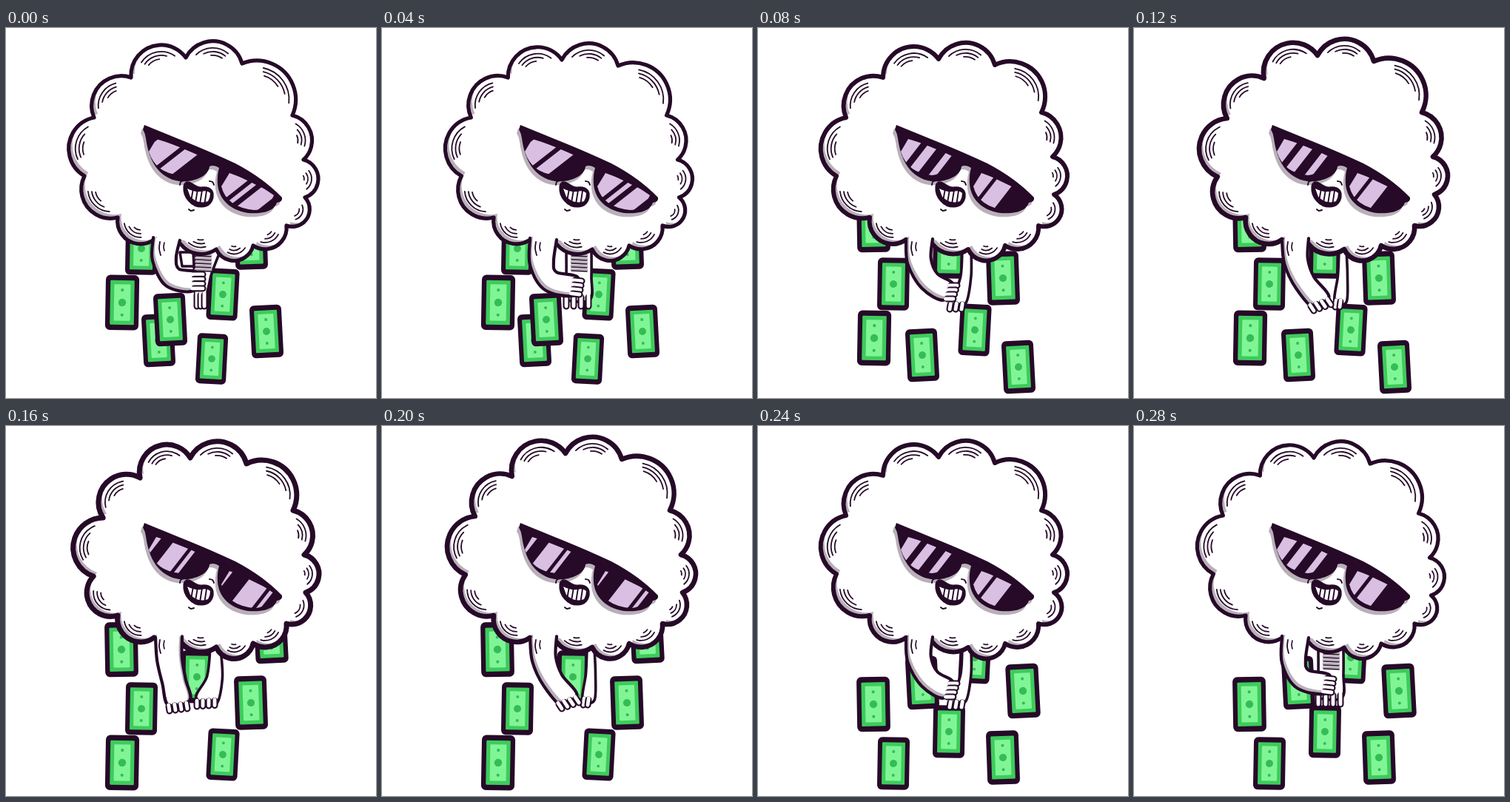
Animation of 500 by 500 pixels, one loop 0.32 s. Source, as an HTML page with a canvas:

```html
<!DOCTYPE html>
<html lang="en">
<head>
<meta charset="utf-8">
<title>Cloud making it rain</title>
<style>
html, body { margin: 0; width: 100%; height: 100%; overflow: hidden; background: #fff; }
canvas { display: block; width: 100vw; height: 100vh; }
</style>
</head>
<body>
<canvas id="stage" width="500" height="500"></canvas>
<script>
const ctx = document.getElementById('stage').getContext('2d');
const INK = '#260a28', GREY = '#b9b0ba', LILAC = '#d9bfe2', WHITE = '#fff';
const STEP = 40, POSE_ORDER = [0, 1, 2, 3, 4, 3, 2, 1];

// Cloud edge, clockwise: alternating notches and bump tops
const LEFT = [110, 242, 106, 200, 85, 158, 119, 121, 127, 77, 169, 67];
const TOP = [197, 25, 243, 40, 283, 18, 319, 48, 371, 55];
const RIGHT = [387, 118, 413, 146, 402, 178, 422, 204, 404, 229];
const START = [200, 286, 161, 284, 151, 256];
const END = [407, 257, 379, 267, 370, 291, 334, 294, 313, 314, 284, 299, 258, 305, 236, 292];

// Per pose: shift of the left, top and right parts, then line width
const SWAY = [
  [0, 0, 0, 0, 0, 0, 5.2],
  [1, 0, 0, 3, -2.5, 0, 5.2],
  [0, 0, 1, 2, -4, -4, 6],
  [5, 1, 5, -3, 2, -4, 6.6],
  [9, 3, 6, 3, 1, -4, 7]
];

// Arm centre lines, one per pose
const FRONT = [
  [217, 285, 214, 312, 225, 337, 255, 343],
  [218, 285, 216, 318, 228, 342, 262, 349],
  [218, 285, 218, 315, 232, 342, 257, 357],
  [218, 285, 219, 315, 231, 344, 254, 371],
  [220, 285, 221, 315, 227, 345, 234, 374]
];
const BACK = [
  [272, 300, 266, 330, 263, 360],
  [266, 300, 266, 335, 264, 366],
  [282, 300, 281, 335, 273, 370],
  [282, 300, 282, 335, 279, 370],
  [283, 300, 282, 340, 270, 372]
];
const BACK_WIDTH = [[17, 7], [17, 17], [6, 8], [5, 8], [7, 14]];

// Fingers: count, first knuckle, step to the next one, reach
const NEAR_HAND = [
  [4, 255, 333, 0, 6.3, 11, 0],
  [4, 261, 341, -1, 6, 9, 1],
  [4, 261, 348, -1.7, 6, 8, 0],
  [4, 239, 376, 7.7, -2.7, 4, 6],
  [4, 220, 379, 8, -1, 1, 6]
];
const FAR_HAND = [
  [3, 258, 361, 5, 0, 0, 15],
  [4, 249, 364, 10, 0, 0, 12],
  [3, 260, 374, 8, 0, -1, 6],
  [2, 273, 370, 6, 0, -1, 7],
  [4, 258, 373, 8, -.5, 0, 6]
];

// Falling bills: x, first y, first beat, beats in view, tilt, scale
const BILLS = [
  [183, 298, 0, 4, 1, 1], [331, 290, 0, 4, -2, 1.02], [156, 266, 1, 3, -1, 1.04],
  [157, 371, 0, 3, 1, 1.05], [206, 422, 0, 1, -3, 1], [358, 284, 2, 2, -3, 1.03],
  [352, 410, 0, 2, -3, 1], [222, 347, 3, 3, -3, 1], [293, 313, 3, 4, 3, .98],
  [258, 303, 1, 3, 1, 1], [278, 447, 0, 1, 3, .96]
];
const FALL = [48, 36, 74, 47];

// Lens glints: slant, then spans along each lens top
const GLINTS = [
  { dx: -46, left: [[.1, .55], [.65, .92]], right: [[0, .43], [.52, .61], [.72, 1.05]] },
  { dx: -28, left: [[0, .32], [.45, .64], [.84, .97]], right: [[0, .3], [.37, .68]] },
  { dx: -28, left: [[0, .16], [.4, .72], [.79, .87]], right: [[0, .12], [.46, .84], [.91, .98]] }
];

function pairs(list) {
  const out = [];
  for (let i = 0; i < list.length; i += 2) out.push([list[i], list[i + 1]]);
  return out;
}

// Smooth curve through points
function curve(p, closed) {
  const n = p.length;
  const at = i => closed ? p[(i + n) % n] : p[Math.max(0, Math.min(n - 1, i))];
  const path = new Path2D();
  path.moveTo(...p[0]);
  for (let i = 0; i < (closed ? n : n - 1); i++) {
    const [a, b, c, d] = [at(i - 1), at(i), at(i + 1), at(i + 2)];
    path.bezierCurveTo(b[0] + (c[0] - a[0]) / 6, b[1] + (c[1] - a[1]) / 6,
      c[0] - (d[0] - b[0]) / 6, c[1] - (d[1] - b[1]) / 6, c[0], c[1]);
  }
  if (closed) path.closePath();
  return path;
}

// Tapered limb around a centre line, open at its start
function limb(list, w1, w2) {
  const p = pairs(list), n = p.length - 1, outer = [], inner = [];
  p.forEach(([x, y], i) => {
    const a = p[Math.max(0, i - 1)], b = p[Math.min(n, i + 1)];
    const dx = b[0] - a[0], dy = b[1] - a[1];
    const k = (w1 + (w2 - w1) * i / n) / Math.hypot(dx, dy);
    outer.push([x - dy * k, y + dx * k]);
    inner.unshift([x + dy * k, y - dx * k]);
  });
  return curve([...outer, ...inner]);
}

function poly(points) {
  const path = new Path2D();
  points.forEach(p => path.lineTo(...p));
  path.closePath();
  return path;
}

function fill(path, color) { ctx.fillStyle = color; ctx.fill(path); }
function stroke(path, width, color = INK) {
  ctx.strokeStyle = color;
  ctx.lineWidth = width;
  ctx.stroke(path);
}
function line(x1, y1, x2, y2, width, color) {
  stroke(poly([[x1, y1], [x2, y2]]), width, color);
}

// White body with grey showing where the shifted copy leaves it bare
function shaded(path, dx, dy) {
  ctx.save();
  fill(path, GREY);
  ctx.clip(path);
  ctx.translate(dx, dy);
  fill(path, WHITE);
  ctx.restore();
}

// Circular arc through three points
function bump([ax, ay], [bx, by], [cx, cy]) {
  const d = 2 * (ax * (by - cy) + bx * (cy - ay) + cx * (ay - by));
  const a = ax * ax + ay * ay, b = bx * bx + by * by, c = cx * cx + cy * cy;
  const x = (a * (by - cy) + b * (cy - ay) + c * (ay - by)) / d;
  const y = (a * (cx - bx) + b * (ax - cx) + c * (bx - ax)) / d;
  const from = Math.atan2(ay - y, ax - x);
  let to = Math.atan2(cy - y, cx - x);
  if (to < from) to += Math.PI * 2;
  return { x, y, r: Math.hypot(ax - x, ay - y), from, to };
}

function makeCloud([lx, ly, tx, ty, rx, ry, width]) {
  const shift = (list, dx, dy) => pairs(list).map(([x, y]) => [x + dx, y + dy]);
  // On the left the notches travel further than the bump tops
  const left = pairs(LEFT).map(([x, y], i) => [x + lx * (i % 2 ? 1.35 : .65), y + ly]);
  const p = [...pairs(START), ...left, ...shift(TOP, tx, ty), ...shift(RIGHT, rx, ry), ...pairs(END)];
  const bumps = [], path = new Path2D();
  for (let i = 0; i + 2 < p.length; i += 2) {
    const b = bump(p[i], p[i + 1], p[i + 2]);
    bumps.push(b);
    path.arc(b.x, b.y, b.r, b.from, b.to);
  }
  return { path, bumps, width };
}
const clouds = SWAY.map(makeCloud);

function drawCloud({ path, bumps, width }) {
  shaded(path, 5, -5);
  bumps.forEach(({ x, y, r, from, to }, i) => {
    const mid = (from + to) / 2, half = (to - from) / 2;
    [[9, .62], [14, .48], [19, .3]].forEach(([inset, part], k) => {
      if (r < inset + 7) return;
      const lean = mid + half * .12 * (k - 1) * (i % 2 ? 1 : -1);
      const mark = new Path2D();
      mark.arc(x, y, r - inset, lean - half * part, lean + half * part);
      stroke(mark, 1.8);
    });
  });
  stroke(path, width);
}

function box(w, h, r, color) {
  const path = new Path2D();
  path.roundRect(-w / 2, -h / 2, w, h, r);
  fill(path, color);
}
function dot(y, r) {
  const path = new Path2D();
  path.arc(0, y, r, 0, Math.PI * 2);
  fill(path, '#35bd55');
}

function drawBill([x, y, first, count, tilt, scale], beat) {
  const age = (beat - first + 4) % 4;
  if (age >= count) return;
  for (let i = 0; i < age; i++) y += FALL[(first + i) % 4];
  ctx.save();
  ctx.translate(x, y);
  ctx.rotate(tilt * Math.PI / 180);
  ctx.scale(scale, scale);
  box(43, 71, 6, INK);
  box(31, 57, 1, '#3ecb5c');
  box(21, 47, 1, '#80f596');
  dot(0, 5);
  dot(-16, 2);
  dot(16, 2);
  ctx.restore();
}

function drawHand([count, x, y, sx, sy, dx, dy]) {
  for (let i = 0; i < count; i++, x += sx, y += sy) {
    line(x, y, x + dx, y + dy, 9);
    line(x - dx * .3, y - dy * .3, x + dx, y + dy, 4.8, WHITE);
  }
}

function drawBackArm(pose) {
  const path = limb(BACK[pose], ...BACK_WIDTH[pose]);
  fill(path, WHITE);
  stroke(path, 3.6);
  drawHand(FAR_HAND[pose]);
  if (pose > 1) return;
  for (let y = 306; y < 328; y += 5) {
    line(256, y, 277, y + 1, 3, GREY);
    line(256, y + 2, 277, y + 3, 1.6);
  }
  if (pose === 0) {
    const cuff = poly([[235, 303], [253, 303], [254, 322], [238, 322]]);
    fill(cuff, WHITE);
    stroke(cuff, 3.5);
  }
}

function drawFrontArm(pose) {
  const straight = pose === 4;
  const path = limb(FRONT[pose], 18, straight ? 15 : 12.5);
  shaded(path, straight ? -4 : 4, straight ? 0 : -5);
  // Blend the shoulder into the body
  fill(poly([[204, 276], [234, 285], [233, 298], [204, 296]]), WHITE);
  stroke(path, 4.2);
  drawHand(NEAR_HAND[pose]);
  stroke(curve([[208, 289], [207, 298], [209, 307]]), 1.8);
  stroke(curve([[214, 290], [213, 296], [214, 301]]), 1.6);
}

const frame = new Path2D('M187 131 C225 147 268 163 310 183 Q348 203 373 229 Q374 235 366 236 ' +
  'Q362 248 342 250 C313 253 288 237 286 211 Q285 199 288 189 Q281 184 275 187 ' +
  'C274 201 252 209 234 207 C207 203 193 180 189 149 Q188 142 185 137 Z');
const lenses = {
  left: { glass: new Path2D('M203 150 Q232 158 262 173 Q255 197 235 199 Q202 196 193 167 Z'), top: [200, 147, 264, 173] },
  right: { glass: new Path2D('M302 196 Q338 208 362 226 Q354 246 335 246 Q298 242 291 214 Z'), top: [299, 193, 363, 224] }
};

function drawGlasses({ dx, ...glints }) {
  ctx.save();
  ctx.translate(-3, 5);
  fill(frame, GREY);
  ctx.restore();
  fill(frame, INK);
  for (const side in lenses) {
    const { glass, top: [x1, y1, x2, y2] } = lenses[side];
    const at = (t, x = 0, y = 0) => [x1 + (x2 - x1) * t + x, y1 + (y2 - y1) * t + y];
    ctx.save();
    ctx.clip(glass);
    for (const [a, b] of glints[side]) {
      fill(poly([at(a), at(b), at(b, dx, 36), at(a, dx, 36)]), LILAC);
    }
    ctx.restore();
  }
}

const mouth = new Path2D('M244 209 C250 207 255 217 264 216 C271 215 278 217 279 224 ' +
  'C280 234 274 241 264 241 C251 241 240 228 241 215 Q241 211 244 209 Z');
const teeth = new Path2D('M245 217 Q254 222 264 221 Q272 219 276 223 Q276 229 273 234 Q260 239 249 228 Z');

function drawMouth() {
  fill(mouth, INK);
  fill(teeth, WHITE);
  for (let i = 0; i < 4; i++) line(253 + i * 6, 217 + i, 250 + i * 6, 234 + i * 2, 1.9);
  stroke(mouth, 3.2);
  stroke(curve([[235, 212], [236, 208], [240, 206]]), 1.9);
  stroke(curve([[275, 207], [279, 208], [281, 212]]), 1.9);
  stroke(curve([[247, 245], [250, 247], [254, 246]]), 2);
}

function draw(time) {
  const step = Math.floor(Math.max(0, time) / STEP) % POSE_ORDER.length;
  const pose = POSE_ORDER[step], beat = step >> 1;
  ctx.fillStyle = WHITE;
  ctx.fillRect(0, 0, 500, 500);
  ctx.lineCap = ctx.lineJoin = 'round';
  // Lower bills lie behind the nearer ones
  BILLS.forEach(bill => drawBill(bill, beat));
  drawBackArm(pose);
  drawCloud(clouds[pose]);
  drawFrontArm(pose);
  drawGlasses(GLINTS[[0, 1, 2, 1][beat]]);
  drawMouth();
  requestAnimationFrame(draw);
}
draw(performance.now());
</script>
</body>
</html>
```
